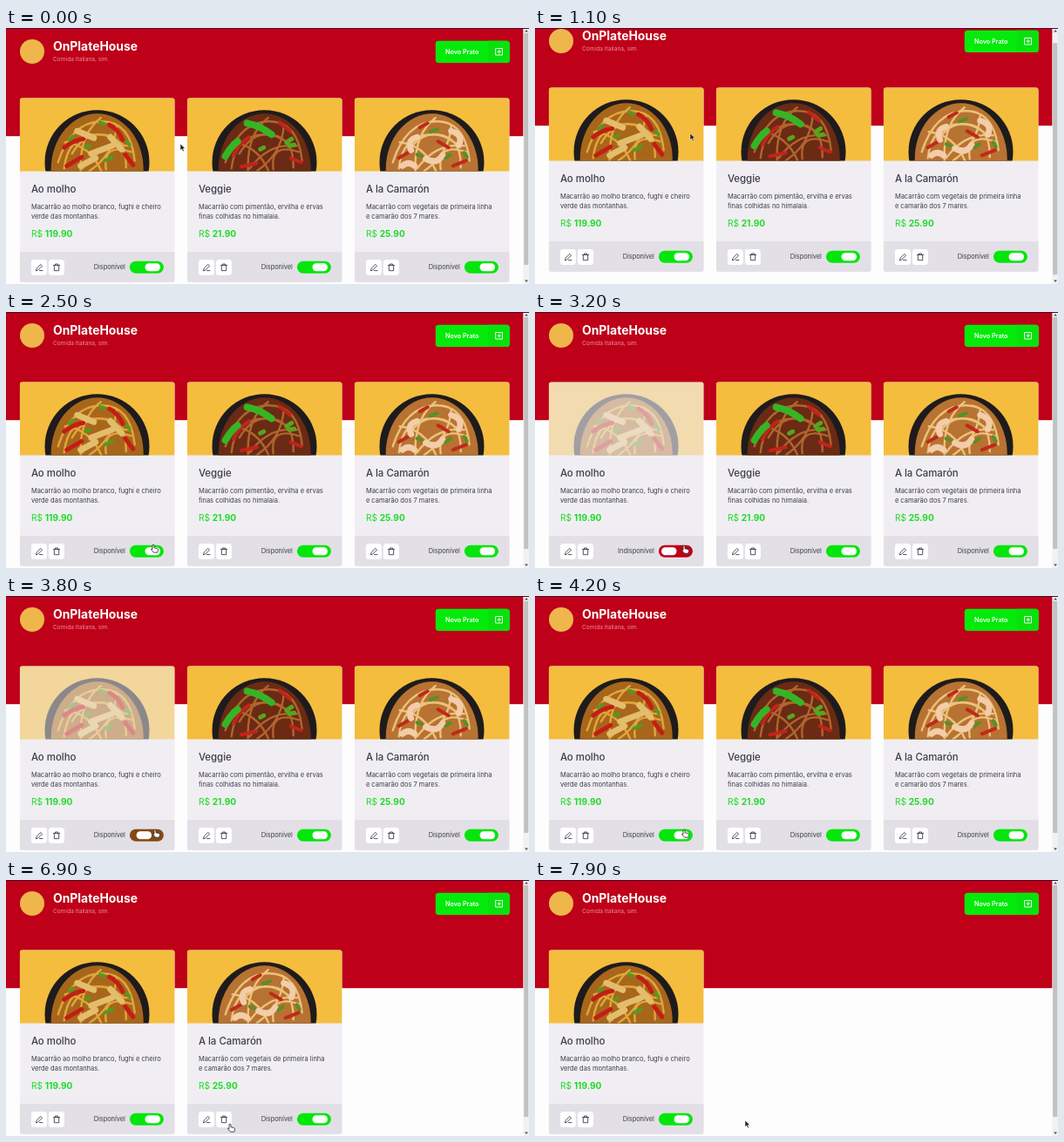
Animation, 600 px wide and 294 px high, one loop 8000 ms. Source, as an HTML page:

```html
<!DOCTYPE html>
<html lang="pt">
<head>
<meta charset="utf-8">
<style>
  html, body { margin: 0; width: 100%; height: 100%; overflow: hidden; background: #fdfdfd; }
  svg { display: block; }
  #stage { width: 600px; height: 294px; font: 7.5px Inter, "Open Sans", sans-serif; fill: #3d3d4d; }
  .line { fill: none; stroke-linecap: round; stroke-linejoin: round; }
</style>
</head>
<body>
<svg id="stage" viewBox="0 0 600 294">
  <defs>
    <clipPath id="round"><rect width="178" height="211.7" rx="3.5"/></clipPath>
    <clipPath id="button"><rect x="492.8" y="14.8" width="85" height="25.2" rx="3.5"/></clipPath>
  </defs>
  <g id="page">
    <rect width="594" height="124.2" fill="#be0019"/>
    <circle cx="30" cy="27" r="14" fill="#efb64c"/>
    <text x="54" y="25.6" font-size="13.9" font-weight="700" fill="#fff">OnPlateHouse</text>
    <text x="54" y="38" font-size="6.6" fill="#f08c9b">Comida Italiana, sim.</text>
    <g clip-path="url(#button)">
      <rect x="492" y="14" width="86" height="27" fill="#04ea0b"/>
      <rect x="553" y="14" width="25" height="27" fill="#08e10e"/>
    </g>
    <text x="504" y="30" font-size="7.2" font-weight="600" fill="#fff">Novo Prato</text>
    <path class="line" stroke="#e8ffe8" d="M562 23.5h7.5v7.5h-7.5zM564 27.2h3.6M565.8 25.4v3.6"/>
    <g id="cards"></g>
  </g>
  <rect width="600" height="1" fill="#4a0c28"/>
  <rect x="593.3" y="1" width="6.7" height="293" fill="#f1f1f1"/>
  <rect id="thumb" x="594.2" width="5" height="266" fill="#c1c1c1"/>
  <path fill="#555" d="M595 4.5h4l-2-2.5zM595 289.5h4l-2 2.5z"/>
  <path id="arrow" fill="#222" stroke="#fff" stroke-width=".5" d="M0 0v7.6l1.8-1.6 1.3 2.8 1.3-.6-1.3-2.7h2.5z"/>
  <path id="hand" fill="#fff" stroke="#222" stroke-width=".8" stroke-linejoin="round" d="M-1 .8q1-1.5 2 0v3l3.5.8q1.2.4 1 1.8l-.7 2.8h-4.3l-3-3.4q-.3-1.2 1.5-.3z"/>
</svg>
<script>
const $ = id => document.getElementById(id);
const GREEN = [4, 230, 11], RED = [190, 0, 25];

// Each dish: noodle tone, strand tone, then toppings as [colour, width, path].
const dishes = [
  { name: 'Ao molho', price: '119.90',
    lines: ['Macarrão ao molho branco, fughi e cheiro', 'verde das montanhas.'],
    base: '#a8661b', strand: '#e0a63c', toppings: [
      ['#c41d16', 5, 'M51 57q10-8 22-10M103 31q10 5 15 17M54 78l17-10M121 65l9 12'],
      ['#e3bd6b', 7, 'M66 38l19 8M82 64l24-9M104 45l13 14M70 78l17-9'],
      ['#4e9c22', 4, 'M57 48l4-4M92 28l5 2M98 72l8-4M123 50l3 4M76 57l4-2']] },
  { name: 'Veggie', price: '21.90',
    lines: ['Macarrão com pimentão, ervilha e ervas', 'finas colhidas no himalaia.'],
    base: '#6a2a14', strand: '#b0652c', toppings: [
      ['#c4221a', 4, 'M53 66q8-15 18-21M106 28l12 10M62 79l18-4M119 69l12 5'],
      ['#35b526', 8, 'M69 29q15 3 28 13M58 50q-7 5-14 17'],
      ['#55a51f', 5, 'M114 51l6-4M117 55l6-1M84 59l4-2']] },
  { name: 'A la Camarón', price: '25.90',
    lines: ['Macarrão com vegetais de primeira linha', 'e camarão dos 7 mares.'],
    base: '#b87231', strand: '#eac27c', toppings: [
      ['#bf2a1b', 4, 'M51 69l14-8M96 50l12 7M113 78l15-6M75 34l9-5'],
      ['#f3ccaa', 7, 'M72 45q-12 3-7 15M111 38q14 4 9 16M82 70q12 7 19-4M55 78q7-6 14 0'],
      ['#559128', 4, 'M87 39l8-3M105 69l5-4M126 63l3 5M72 65l5 2']] }
];
const strands = 'M44 74q15-46 49-47t39 45M51 81q4-38 38-39t33 38M60 64q23-38 59-10M52 51q29 3 42 34M93 23q-25 19-23 61M111 32q-2 32-31 52M126 55q-32-4-54 26M99 82q-4-31 29-20';

const line = (color, width, d) => `<path class="line" stroke="${color}" stroke-width="${width}" d="${d}"/>`;

function card(dish) {
  return `<g clip-path="url(#round)">
    <rect width="178" height="212" fill="#f0eef2"/>
    <svg class="photo" width="178" height="84.3">
      <rect width="178" height="85" fill="#f5bd3e"/>
      <circle cx="88.8" cy="74" r="60" fill="#1e1b1c"/>
      <ellipse cx="89" cy="82" rx="53" ry="64" fill="${dish.base}"/>
      ${line(dish.strand, 2.4, strands)}
      ${dish.toppings.map(t => line(...t)).join('')}
    </svg>
    <text x="13.2" y="109" font-size="11.4" font-weight="500">${dish.name}</text>
    <text x="13.2" y="127.7">${dish.lines[0]}</text>
    <text x="13.2" y="138.7">${dish.lines[1]}</text>
    <text x="13.2" y="159.7" font-size="10.1" fill="#1edb28">R$ <tspan font-weight="700">${dish.price}</tspan></text>
    <rect y="176.7" width="178" height="35" fill="#e2e0e6"/>
    <rect x="13.2" y="185.6" width="18" height="18" rx="3.5" fill="#fff"/>
    <rect x="33.2" y="185.6" width="18" height="18" rx="3.5" fill="#fff"/>
    ${line('#3d3d4d', .9, 'M18.8 198.2l.6-2.3 4.7-4.7 1.7 1.7-4.7 4.7zM22.8 198.3h3.5')}
    ${line('#3d3d4d', .9, 'M38.8 192.2h7M40.8 192v-1.3h3v1.3M39.6 192.4v6h5.4v-6')}
    <text class="label" x="121.2" y="196.8" font-size="7.4" text-anchor="end"></text>
    <rect class="track" x="126.2" y="187.5" width="39" height="14" rx="7"/>
    <rect class="knob" y="190" width="17.5" height="9" rx="4.5" fill="#fff"/>
  </g>`;
}

$('cards').innerHTML = dishes.map(card).join('');
const cards = [...$('cards').children];

// Stepped keys: [time, ...values]
const scrollKeys = [[0, 0], [1000, 4], [1100, 12], [1200, 16], [1300, 17], [1700, 10], [1800, 3], [1900, 0]];
const pointerKeys = [ // time, x, y, hand
  [0, 200, 133, 0], [600, 190, 128, 0], [700, 178, 121, 0],
  [2200, 176, 155, 0], [2300, 173, 205, 0], [2400, 169, 250, 0], [2500, 169, 267, 1], [2700, 171, 268, 1],
  [4500, 188, 276, 0], [4600, 211, 279, 0], [4700, 228, 280, 1], [4800, 239, 281, 0],
  [5100, 245, 280, 1], [5200, 250, 279, 1], [5600, 253, 278, 1],
  [6700, 254, 279, 1], [6900, 257, 280, 1], [7300, 253, 279, 1], [7400, 248, 277, 1],
  [7600, 243, 276, 1], [7800, 241, 276, 0]
];
const at = (keys, t) => keys.filter(k => k[0] <= t).pop().slice(1);

const ease = (t, start, length) => {
  const p = Math.min(1, Math.max(0, (t - start) / length));
  return p * p * (3 - 2 * p);
};
const move = (el, x, y) => el.setAttribute('transform', `translate(${x} ${y})`);
const show = (el, visible) => el.style.display = visible ? '' : 'none';

function setAvailable(el, on, fade, label) {
  const part = name => el.querySelector('.' + name);
  part('photo').setAttribute('opacity', .36 + .64 * fade);
  part('label').textContent = label;
  part('track').setAttribute('fill', `rgb(${RED.map((c, i) => c + (GREEN[i] - c) * on)})`);
  part('knob').setAttribute('x', 129.3 + 14.5 * on);
}

function draw(now) {
  const t = Math.floor(now % 8000 / 100) * 100;
  const [scroll] = at(scrollKeys, t);
  move($('page'), 0, -scroll);
  $('thumb').setAttribute('y', 6 + scroll * .94);

  const alive = [true, t < 6100, t < 7800];
  let slot = 0;
  cards.forEach((el, i) => {
    show(el, alive[i]);
    if (alive[i]) move(el, 15.7 + 192 * slot++, 80.3);
    setAvailable(el, 1, 1, 'Disponível');
  });
  const on = 1 - ease(t, 2650, 400) + ease(t, 3650, 400);
  const fade = 1 - ease(t, 2650, 600) + ease(t, 3650, 550);
  setAvailable(cards[0], on, fade, t >= 2700 && t < 3700 ? 'Indisponível' : 'Disponível');

  const [x, y, hand] = at(pointerKeys, t);
  show($('arrow'), !hand);
  show($('hand'), hand);
  move($('arrow'), x, y);
  move($('hand'), x, y);
}

const start = performance.now();
(function loop() {
  draw(performance.now() - start);
  requestAnimationFrame(loop);
})();
</script>
</body>
</html>
```
